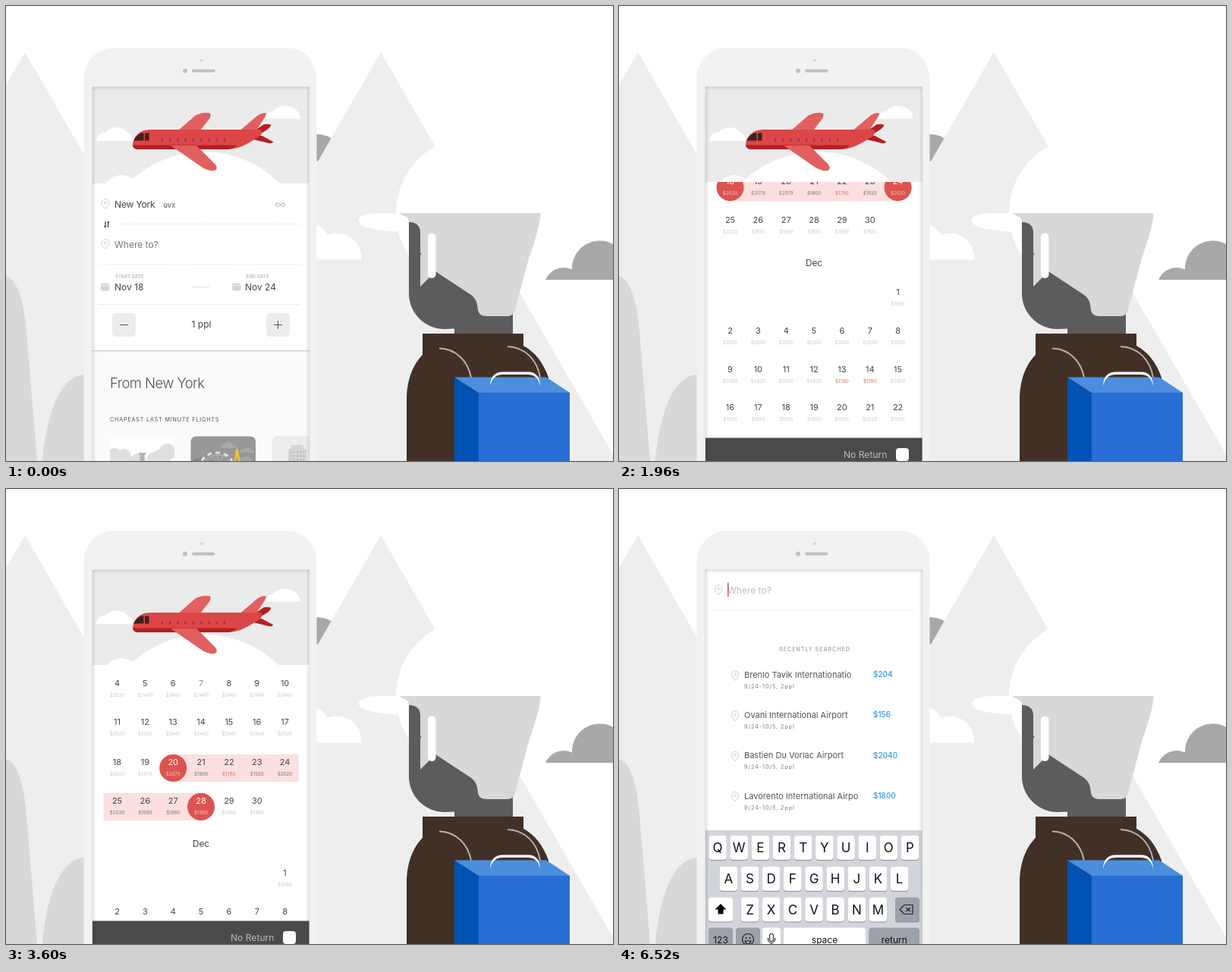
Write an HTML page with a canvas that moves like this. It is 800x600 px and loops after 6.72 s.

```html
<!DOCTYPE html>
<html lang="en">
<head>
<meta charset="utf-8">
<title>Flight booking</title>
<style>
html, body { margin: 0; width: 100%; height: 100%; overflow: hidden; background: #fff; }
canvas { display: block; width: 800px; height: 600px; }
</style>
</head>
<body>
<canvas id="stage" width="800" height="600"></canvas>
<script>
const g = document.getElementById('stage').getContext('2d');
const LOOP = 6720, STEP = 40;
const RED = '#dd5350', INK = '#444';

// Helpers
const clamp = v => Math.max(0, Math.min(1, v));
const span = (t, a, b) => clamp((t - a) / (b - a));
const sine = v => (1 - Math.cos(Math.PI * v)) / 2;
const out = (v, n) => 1 - Math.pow(1 - v, n);

function rect(c, x, y, w, h, r = 0) {
  g.fillStyle = c;
  g.beginPath();
  g.roundRect(x, y, w, h, r);
  g.fill();
}
function disc(c, x, y, r) {
  g.fillStyle = c;
  g.beginPath();
  g.arc(x, y, r, 0, 7);
  g.fill();
}
function shape(c, d) {
  g.fillStyle = c;
  g.fill(new Path2D(d));
}
function stroke(c, d, w = 1) {
  g.strokeStyle = c;
  g.lineWidth = w;
  g.stroke(new Path2D(d));
}
function dashed(x, y, x2) {
  g.setLineDash([3, 2]);
  stroke('#e6e6e6', `M${x} ${y}H${x2}`);
  g.setLineDash([]);
}
function text(s, x, y, size, c, { w = 400, align = 'left', gap = 0 } = {}) {
  g.font = `${w} ${size}px Inter, "Open Sans", sans-serif`;
  g.textAlign = align;
  g.letterSpacing = gap + 'px';
  g.fillStyle = c;
  g.fillText(s, x, y);
}
function group(fn, { a = 1, x = 0, y = 0, s = 1, clip } = {}) {
  if (a <= 0) return;
  g.save();
  g.globalAlpha *= a;
  if (clip) {
    g.beginPath();
    g.rect(...clip);
    g.clip();
  }
  g.translate(x, y);
  g.scale(s, s);
  fn();
  g.restore();
}

// Backdrop
function landscape() {
  rect('#fff', 0, 0, 800, 600);
  shape('#eeeeee', 'M25 61L336 600H-286Z');
  shape('#d9d7d8', 'M0 356C16 361 24 392 27 430L41 600H0ZM48 600C54 530 75 486 104 486V600Z');
  shape('#a8a8a8', 'M374 205A36 36 0 0 1 446 205Z');
  shape('#eeeeee', 'M494 61L805 600H183Z');
  shape('#fff', 'M378 334.500V312A24 24 0 0 1 424 302A32 32 0 0 1 468 334.500Z');
  shape('#a8a8a8', 'M711 361A26 26 0 0 1 746 347.500A36.500 36.500 0 0 1 800 314V361Z');
}

function traveler() {
  disc('#fff', 615, 273, 101);
  shape('#fff', 'M465 283C465 276 478 273 495 273H535V299.500C505 296 465 296 465 283Z');
  shape('#5c5c5c', 'M531 285H546L620 360L668 400V432H591V425.500L578 426A47 47 0 0 1 531 379Z');
  shape('#d9d7d8', 'M518 273H704.500C704 290 696 312 689 333L672 396C671 404 668 409 661 409H634C626 409 622 406 621.500 397C621 389 617 383 610 379L566 350L546 370V299C546 290 541 285 531 285C531 277 523 277 518 273Z');
  shape('#5c5c5c', 'M545 324L547.500 327L545 330Z');
  rect('#fff', 556, 299.500, 10.500, 59.500, 5);
  shape('#423026', 'M549 432H682V448C697 456 708 470 715 490V600H528V520C528 492 537 472 549 460Z');
  stroke('#b9aeb0', 'M571 451.500C593 452 609 468 613 490M661 449C684 450 700 466 704 490', 2);
  shape('#0052b4', 'M591 489.500L623 510V600H591Z');
  shape('#4a8edd', 'M591 489.500H712L743 510H623Z');
  shape('#286ed4', 'M623 510H743V600H623Z');
  shape('#fff', 'M638 501C638 488 645 482.500 655 482.500H688C699 482.500 704 490 704 501C702 491 697 486 687 486H655C645 486 640 492 638 501Z');
}

function phone() {
  rect('#f2f2f2', 102.500, 55, 307, 600, 40);
  disc('#c0bfbf', 236, 85.500, 3);
  rect('#c0bfbf', 245, 83.500, 30.500, 4, 2);
  shape('#d8d8d8', 'M255 72.500A2.700 2.700 0 0 1 260.500 72.500L257.700 74Z');
}

function screenEdge() {
  const fade = (x, y, w, h, dx, dy) => {
    const f = g.createLinearGradient(dx < 0 ? x + w : x, y, dx > 0 ? x + w : x, dy ? y + h : y);
    f.addColorStop(0, 'rgba(0,0,0,.1)');
    f.addColorStop(1, 'rgba(0,0,0,0)');
    g.fillStyle = f;
    g.fillRect(x, y, w, h);
  };
  fade(114, 107, 5, 493, 1, 0);
  fade(395, 107, 5, 493, -1, 0);
  fade(114, 107, 286, 4, 0, 1);
  stroke('#dfdfdf', 'M113.500 600V106.500H400V600');
}

// Header with the plane
function hero() {
  rect('#ebebeb', 114, 107, 286, 127);
  disc('#fff', 261, 332, 140);
  disc('#fff', 152, 248, 25);
  shape('#fff', 'M119 178C120 170 125 166 131 167C138 158 154 158 160 167C165 168 167 172 167 178Z');
  shape('#fff', 'M342 148.500C343 142 347 138 352 139C361 127 385 129 388 148.500Z');
  shape('#b51f21', 'M325 166L340 156Q347 155 349.500 157Q348 162 334 169ZM325 171L337 171L352 179Q352 181 347 181L326 176Z');
  shape('#e25f5f', 'M227 164L250 144Q261 139 269 141.500Q271 145 267 150L256 164Z');
  shape('#e25f5f', 'M306 166L332 144Q339 140 343 141.500Q342 147 328 166Z');
  shape('#dc4646', 'M167 183C168 172 176 163 190 163H336Q340 169 331 174C319 181 309 188 294 189H175Q167 189 167 183Z');
  shape('#b51f21', 'M167 183.500H305C300 187 296 189 290 189H175Q168 189 167 183.500Z');
  shape('#e25f5f', 'M217 184H251L276 209Q280 215 275 217Q267 218 259 213Z');
  shape('#40211f', 'M168 177.500Q172 170 178 167.500H181.500V177.500ZM183 167.500H188.500V177.500H183Z');
  for (let i = 0; i < 9; i++) rect('#a93350', 204.500 + i * 10.300, 174, 2.500, 4.500, 1.200);
}

// Icons
function pin(x, y, c) {
  group(() => stroke(c, 'M0 6.500C-2.500 3.500 -4.800 1.500 -4.800 -1.500A4.800 4.800 0 1 1 4.800 -1.500C4.800 1.500 2.500 3.500 0 6.500ZM-1.500 -1.500A1.500 1.500 0 1 1 1.500 -1.500A1.500 1.500 0 1 1 -1.500 -1.500'), { x, y });
}
function infinity(x, y, s, c) {
  group(() => stroke(c, 'M0 0C2 -3 6 -3 6 0S2 3 0 0S-6 -3 -6 0S-2 3 0 0', 1.100 / s), { x, y, s });
}
function dateIcon(x) {
  rect('#d6d6d6', x, 365.500, 11.500, 10, 3);
  rect('#f0f0f0', x + 1, 368, 9.500, 1);
}

// Booking form
function destination(y, c) {
  pin(131, y, '#cfcfcf');
  text('Where to?', 143, y + 4.500, 12, c);
  dashed(125, y + 26.500, 388);
}

function fields(people, press) {
  rect('#fff', 114, 234, 286, 220);
  pin(131, 261, '#cfcfcf');
  text('New York', 143, 266, 12, INK, { gap: -0.150 });
  text('QVX', 207.500, 266, 7, '#888', { w: 800 });
  infinity(361.500, 262, 1, '#bbb');
  stroke('#333', 'M131 284V292M129.500 290L131 292M134.500 292V284M136 286L134.500 284', 1.200);
  dashed(147, 287.500, 388);
  text('START DATE', 144, 359, 6.100, '#c2c2c2', { w: 700 });
  text('END DATE', 316.500, 359, 6.100, '#c2c2c2', { w: 700 });
  dateIcon(125);
  dateIcon(298);
  text('Nov 18', 143, 375, 12, INK);
  text('Nov 24', 315, 375, 12, INK);
  stroke('#e2e2e2', 'M245 370.500H268');
  dashed(122, 393.500, 388);
  const tone = Math.round(236 - 26 * press);
  rect('#ececec', 140, 405, 31, 31, 5);
  rect(`rgb(${tone},${tone},${tone})`, 343, 405, 31, 31, 5);
  stroke('#555', 'M150 420.500H161M353 420.500H364M358.500 415V426');
  text(people + ' ppl', 257.500, 424, 12, INK, { align: 'center' });
}

function deals() {
  rect('#fafafa', 114, 454, 286, 146);
  rect('#ececec', 114, 452, 286, 4);
  rect('#cfcfcf', 114, 453, 286, 2);
  text('From New York', 137, 503.500, 18.500, '#555', { w: 300, gap: -0.580 });
  text('CHAPEAST LAST MINUTE FLIGHTS', 137, 548, 7.200, '#555', { gap: 0.820 });
  group(() => {
    rect('#fff', 137, 568, 85, 40);
    for (const [x, y, r] of [[143, 592, 9], [155, 594, 10], [174, 601, 11], [195, 597, 9], [213, 588, 11], [205, 596, 12]]) disc('#dfdfdf', x, y, r);
    shape('#b4b4b4', 'M175 589H184V592H182.500V600H176.500V592H175Z');
  }, { clip: [137, 567, 85, 33] });
  rect('#979797', 243.500, 567.500, 85.500, 50, 7);
  shape('#a9a9a9', 'M283 583Q284 577 289 577Q294 571 299 578Q304 579 304 583ZM308 589Q309 584 314 585Q319 579 325 586L329 589Z');
  disc('#858585', 254, 606, 10);
  disc('#a6a6a6', 316, 604, 10);
  g.setLineDash([6, 5]);
  stroke('#e8e8e8', 'M258 600A22 19 0 0 1 298 600', 3);
  g.setLineDash([]);
  stroke('#b9b9b9', 'M263 600A17 13 0 0 1 294 600M279 588V600M270 590L276 600M288 590L282 600');
  shape('#ecbd45', 'M304.500 583L307 587V591L309 600H306L304.500 594L303 600H300.500L302 591V587Z');
  rect('#ececec', 351, 567, 60, 50, 7);
  rect('#d6d6d6', 372, 584, 24, 16);
  rect('#d6d6d6', 376, 579, 16, 5);
  for (let i = 0; i < 15; i++) rect('#bdbdbd', 374.500 + i % 5 * 4.200, 587 + Math.floor(i / 5) * 5, 2, 2.500);
}

function home(people, press) {
  hero();
  deals();
  fields(people, press);
  destination(314, '#777');
}

// Calendar: y of the numbers, first column, first day, prices
const weeks = [
  [256, 0, 4, '2020 2440 2440 2440 2440 2440 2440'],
  [307, 0, 11, '2020 2020 2440 2440 2440 2440 2020'],
  [360, 0, 18, '2020 2079 2079 1800 1780 1920 2020'],
  [411, 0, 25, '2020 1980 1980 1980 1980 1980'],
  [505.500, 6, 1, '1980'],
  [556.500, 0, 2, '2020 2020 2020 2020 2020 2020 2020'],
  [607.500, 0, 9, '2400 2400 2400 2400 1780 1780 2400'],
  [658, 0, 16, '1800 1800 1800 1800 1800 2020 1980'],
  [709, 0, 23, '2020 2020 2020 2020 2020 2020 2020']
].map(([y, first, day, p]) => ({ y, first, day, prices: p.split(' ') }));
const colX = i => 146.500 + 36.850 * i;

function cell(week, i, ink, fee) {
  const x = colX(week.first + i), p = week.prices[i];
  text(week.day + i, x, week.y + 4, 11, ink, { align: 'center' });
  text('$' + p, x, week.y + 18.200, 6.200, p === '1780' && fee !== '#f6c9c8' ? '#e06a68' : fee, { align: 'center' });
}

function selection(from, to) {
  for (const week of weeks.slice(2, 4)) {
    const last = week.day + week.prices.length - 1;
    if (to < week.day || from > last) continue;
    const a = Math.max(from, week.day), b = Math.min(to, week.day + 6);
    const left = a === from ? colX(a - week.day) : 128.500;
    const right = b === to ? colX(b - week.day) : 385.500;
    if (right > left) rect('#fbe0df', left, week.y - 10, right - left, 36);
    for (let d = a; d <= Math.min(b, last); d++) {
      const end = d === from || d === to;
      if (end) disc(RED, colX(d - week.day), week.y + 8, 18);
      cell(week, d - week.day, end ? '#fff' : INK, end ? '#f6c9c8' : '#777');
    }
  }
}

function calendar(t) {
  const scroll = 170 * (sine(span(t, 1632, 2120)) - sine(span(t, 2240, 2800)));
  const cleared = span(t, 2920, 3080), picked = span(t, 3520, 3600);
  rect('#fff', 114, 232, 286, 368);
  group(() => {
    weeks.forEach((week, r) => week.prices.forEach((p, i) =>
      cell(week, i, r === 0 && i === 3 ? '#8c8c8c' : INK, '#c9c9c9')));
    text('Dec', 257, 472, 11.800, INK, { align: 'center' });
    group(() => selection(18, 24), { a: 1 - cleared });
    group(() => selection(20, 20), { a: picked < 1 ? cleared : 0 });
    group(() => selection(20, 28), { a: picked });
  }, { y: -scroll, clip: [114, 232, 286, 338] });
}

function returnBar(y) {
  group(() => {
    rect('#4a4a4a', 114, 569.500, 286, 31);
    text('No Return', 296, 596, 12.100, '#bdbdbd');
    rect('#fff', 365, 583, 17, 17, 4);
  }, { y });
}

// Search
const recent = [
  ['Brenlo Tavik Internationatio', '$204'],
  ['Ovani International Airport', '$156'],
  ['Bastien Du Vorlac Airport', '$2040'],
  ['Lavorento International Airpo', '$1800']
];

function recentList() {
  text('RECENTLY SEARCHED', 258, 213.500, 7, '#aaa', { w: 600, align: 'center', gap: 1 });
  recent.forEach(([name, price], i) => {
    const y = 245 + 53.200 * i;
    pin(153, y + 1, '#cfcfcf');
    text(name, 165, y + 4, 11, '#555');
    text('9/24-10/5, 2ppl', 165, y + 18, 7, '#8c8c8c', { w: 500, gap: 1 });
    text(price, 335, y + 3.200, 10, '#2f9be6', { w: 500 });
  });
}

function flexibleBar() {
  rect('#fff', 114, 405, 286, 46);
  rect('#ececec', 114, 403, 286, 4);
  rect('#cfcfcf', 114, 404, 286, 2);
  stroke('#888', 'M278.500 428A7.500 7.500 0 1 1 293.500 428A7.500 7.500 0 1 1 278.500 428');
  g.font = 'italic 11px "Noto Serif", serif';
  g.textAlign = 'center';
  g.fillStyle = '#777';
  g.fillText('i', 286, 432);
  text('Flexible', 297, 432.500, 12, '#777');
  rect('#ececec', 351, 417, 34, 22, 3);
  infinity(368, 428, 1.850, '#aaa');
}

function key(x, y, w, label, c = '#fff', size = 17) {
  rect('#8b8d92', x, y + 1, w, 32, 4);
  rect(c, x, y, w, 32, 4);
  text(label, x + w / 2, y + (size > 15 ? 22 : 20.500), size, '#111', { align: 'center' });
}

function keyboard() {
  const grey = '#9da1a9';
  rect('#d2d5db', 114, 450, 286, 160);
  [['QWERTYUIOP', 118.200, 457], ['ASDFGHJKL', 132.500, 498], ['ZXCVBNM', 160.700, 538.500]].forEach(([row, x, y]) =>
    [...row].forEach((ch, i) => key(x + 28.170 * i, y, 23.600, ch)));
  key(118, 538.500, 32, '');
  key(364, 538.500, 32, '', grey);
  shape('#000', 'M134 547L141.500 554.500H137.500V560.500H130.500V554.500H126.500Z');
  stroke('#222', 'M370 554.500L376 548.500H387V560.500H376ZM378.500 552L384 557M384 552L378.500 557', 1.200);
  key(118, 578.500, 32, '123', grey, 12);
  key(154, 578.500, 32, '', grey);
  key(189, 578.500, 24, '');
  key(217, 578.500, 108, 'space', '#fff', 12);
  key(329.500, 578.500, 66.500, 'return', grey, 12);
  stroke('#222', 'M162.500 594A7.500 7.500 0 1 1 177.500 594A7.500 7.500 0 1 1 162.500 594M166 596H174Q173 600 170 600Q167 600 166 596', 1.200);
  disc('#222', 167.500, 592, 1.100);
  disc('#222', 172.500, 592, 1.100);
  stroke('#222', 'M198.500 589A2.500 2.500 0 0 1 203.500 589V594A2.500 2.500 0 0 1 198.500 594ZM196.500 592V594A4.500 4.500 0 0 0 205.500 594V592M201 598.500V601', 1.100);
}

function search(t) {
  const move = out(span(t, 4760, 5160), 3.250);
  const up = out(span(t, 4760, 4960), 3);
  const late = span(t, 4960, 5160);
  const y = 314 - 181 * move;
  const top = 234 - 160 * move;
  hero();
  rect('#fff', 114, top, 286, 600);
  group(() => {
    deals();
    fields(3, 0);
  }, { a: 1 - span(t, 4760, 4900), y: y - 314 });
  destination(y, t < 4840 ? '#777' : '#bdbdbd');
  const blink = t < 5320 || Math.floor((t - 5320) / 240) % 2 === 1;
  if (t >= 4880 && blink) rect('#d9545c', 143, y - 9.500, 1.500, 18.500);
  group(recentList, { a: late });
  const drop = 150 * (1 - up);
  group(flexibleBar, { a: late < 1 ? 1 : 0, y: drop + 48 * sine(late) });
  group(keyboard, { y: drop });
}

function screen(t) {
  rect('#fff', 114, 107, 286, 493);
  if (t >= 4800) return search(t);
  const people = t < 560 ? 1 : t < 760 ? 2 : 3;
  const press = Math.sin(Math.PI * span(t, 500, 660)) + Math.sin(Math.PI * span(t, 720, 880));
  const open = sine(span(t, 1120, 1360)) - sine(span(t, 4080, 4320));
  if (open < 1) home(people, press);
  else hero();
  if (open > 0) {
    group(() => calendar(t), { a: open });
    returnBar(31 * (1 - open));
  }
}

function frame(now) {
  const t = Math.floor(now % LOOP / STEP) * STEP;
  landscape();
  traveler();
  phone();
  group(() => screen(t), { clip: [114, 107, 286, 493] });
  screenEdge();
}

const start = performance.now();
function tick() {
  frame(performance.now() - start);
  requestAnimationFrame(tick);
}
tick();
</script>
</body>
</html>
```
